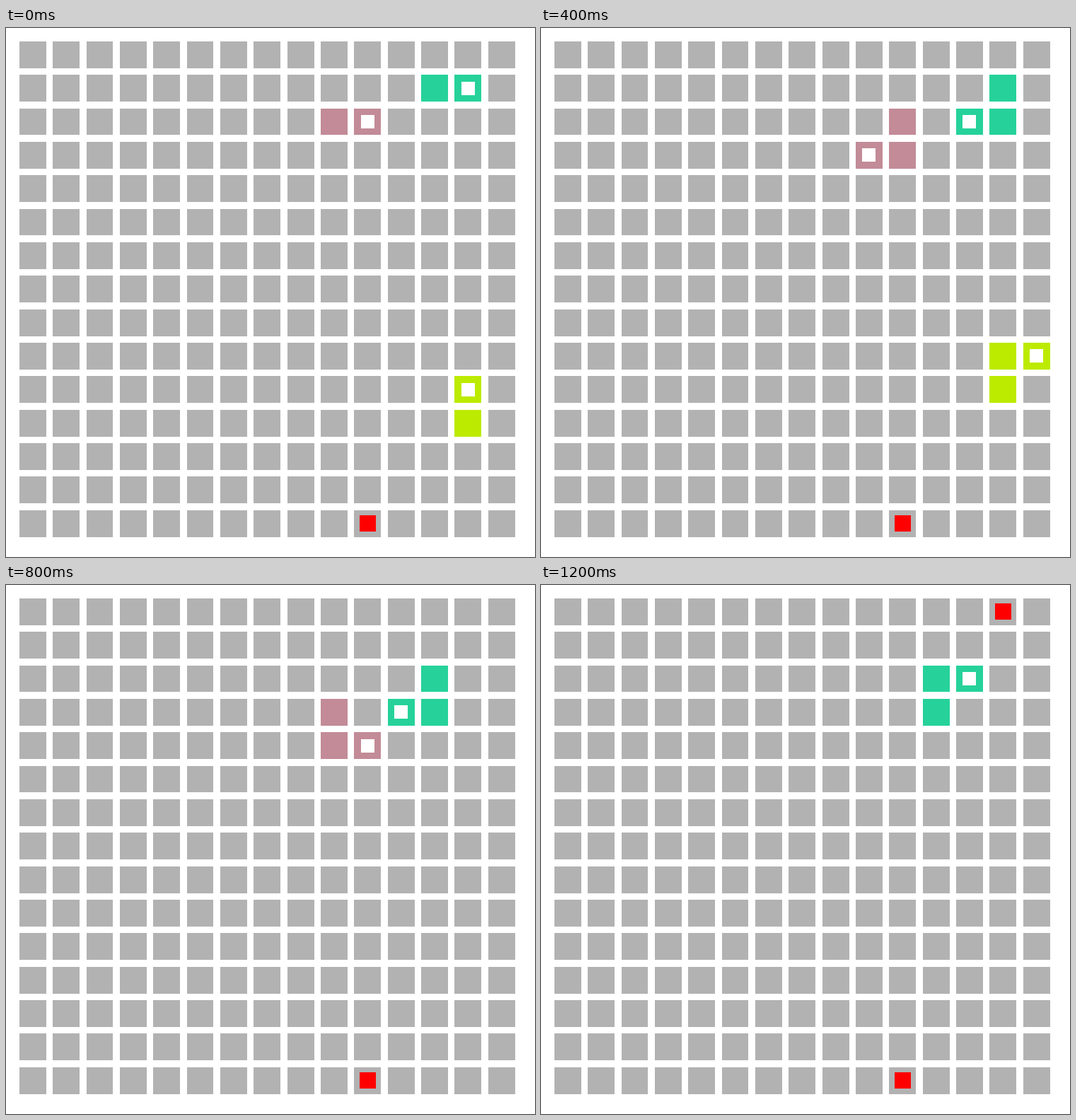
Recreate the animation shown at these times as an HTML page with a canvas. Size 748 px wide and 748 px high, loop 1400 ms.

```html
<!DOCTYPE html>
<html lang="en">
<head>
<meta charset="utf-8">
<title>Snakes</title>
<style>
  html, body { margin: 0; width: 100%; height: 100%; overflow: hidden; background: #fff; }
  canvas { display: block; width: 748px; height: 748px; }
</style>
</head>
<body>
<canvas id="board" width="748" height="748"></canvas>
<script>
const ctx = document.getElementById('board').getContext('2d');
const SIZE = 748, CELLS = 15, STEP = 200, STEPS = 7;
const PITCH = SIZE / 15.8;
const DIRS = { U: [0, -1], D: [0, 1], L: [-1, 0], R: [1, 0] };

// A snake leaves the board once its moves run out.
const snakes = [
  { color: '#26d29a', start: [12, 1], moves: 'RDLDLUR' },
  { color: '#c28b97', start: [9, 2], moves: 'RDLDRU' },
  { color: '#bdeb00', start: [13, 11], moves: 'UURU' }
];
const foods = [
  { cell: [10, 14], from: 0 },
  { cell: [13, 0], from: 6 }
];

for (const s of snakes) {
  s.path = [s.start];
  for (const m of s.moves) {
    const [x, y] = s.path[s.path.length - 1];
    s.path.push([x + DIRS[m][0], y + DIRS[m][1]]);
  }
}

const snap = v => Math.round(v * PITCH - 0.02);

// Square centred in a cell; scale is relative to the pitch.
function square([col, row], scale, color) {
  const x0 = snap(col + 0.8 - scale / 2), x1 = snap(col + 0.8 + scale / 2);
  const y0 = snap(row + 0.8 - scale / 2), y1 = snap(row + 0.8 + scale / 2);
  ctx.fillStyle = color;
  ctx.fillRect(x0, y0, x1 - x0, y1 - y0);
}

function draw(step) {
  ctx.fillStyle = '#fff';
  ctx.fillRect(0, 0, SIZE, SIZE);
  for (let row = 0; row < CELLS; row++)
    for (let col = 0; col < CELLS; col++) square([col, row], 0.8, '#b2b2b2');

  for (const f of foods) if (step >= f.from) square(f.cell, 0.48, '#f00');

  for (const s of snakes) {
    if (step >= s.moves.length) continue;
    const head = step + 1;
    for (let i = Math.max(0, head - 2); i <= head; i++) square(s.path[i], 0.8, s.color);
    square(s.path[head], 0.4, '#fff');
  }
}

const began = performance.now();
function tick() {
  draw(Math.floor((performance.now() - began) / STEP) % STEPS);
  requestAnimationFrame(tick);
}
tick();
</script>
</body>
</html>
```
